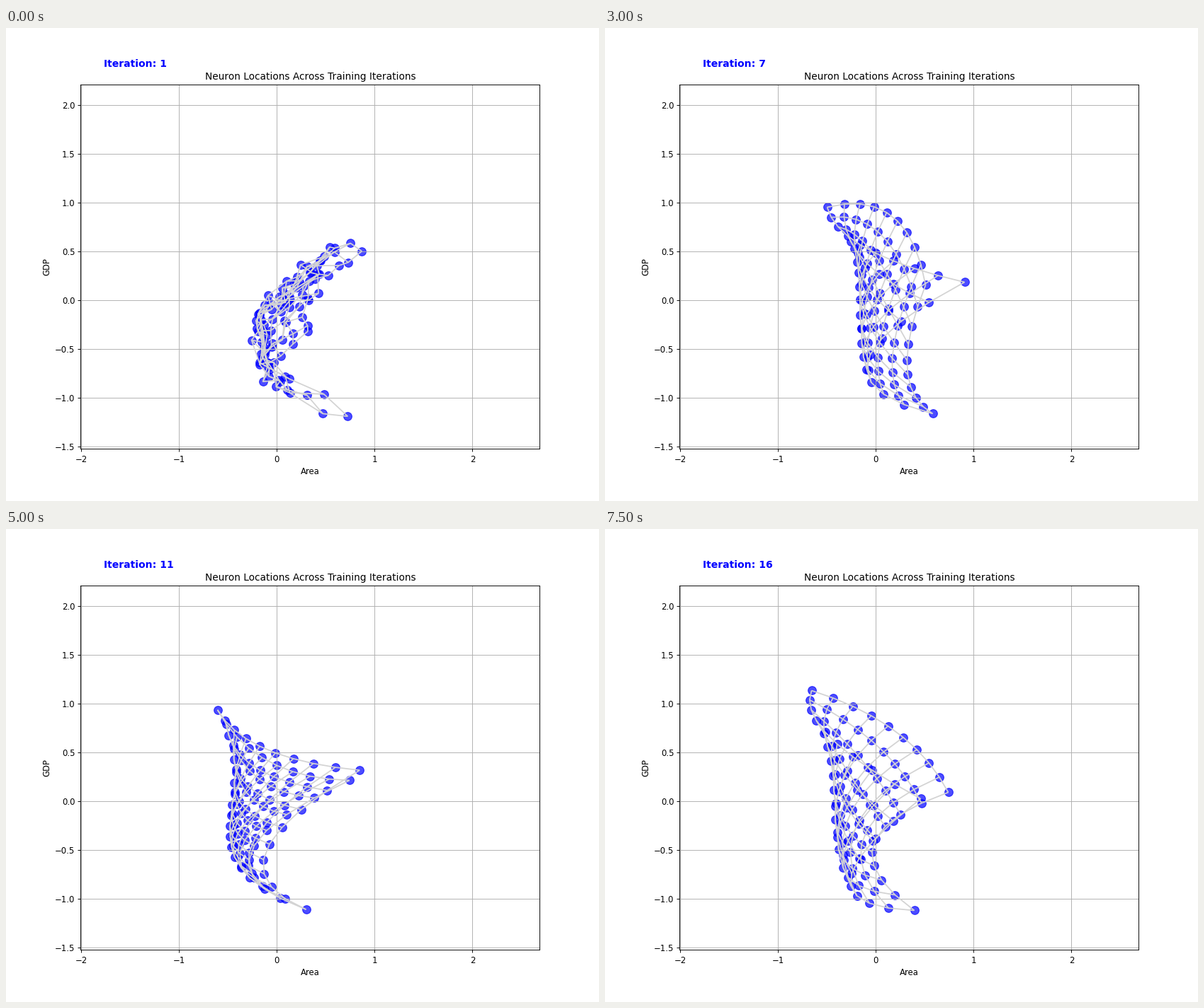
A matplotlib script for the animation above (8000 ms loop, 837 by 669 pixels).

```python
import numpy as np
import matplotlib.pyplot as plt
from matplotlib.animation import FuncAnimation
from matplotlib.collections import LineCollection

W, H, DPI = 837, 669, 83.7
LEFT, RIGHT, BOTTOM, TOP = 0.126, 0.9, 0.11, 0.88
SIZE = 10                         # neurons per side of the map
STEPS = 16
X0, Y0, UNIT = 382.4, 385.4, 138  # data origin and unit on the stage, in pixels

# Key shapes of the map: corners, edge middles and centre as stage positions
KEYS = {
    1: [[(492, 315), (437, 325), (434, 382)],
        [(440, 358), (365, 412), (360, 440)],
        [(416, 439), (375, 500), (481, 545)]],
    3: [[(399, 193), (449, 300), (410, 389)],
        [(493, 318), (458, 368), (350, 462)],
        [(434, 401), (358, 472), (390, 526)]],
    5: [[(276, 110), (304, 225), (397, 362)],
        [(317, 233), (322, 352), (422, 463)],
        [(438, 366), (349, 477), (390, 530)]],
    7: [[(313, 253), (405, 266), (452, 363)],
        [(370, 312), (363, 382), (426, 480)],
        [(507, 359), (370, 472), (462, 545)]],
    10: [[(297, 299), (341, 341), (523, 339)],
         [(355, 346), (300, 420), (380, 464)],
         [(478, 345), (325, 455), (463, 549)]],
    13: [[(300, 168), (423, 253), (450, 344)],
         [(403, 294), (350, 374), (338, 441)],
         [(497, 375), (385, 463), (343, 515)]],
    16: [[(291, 228), (410, 286), (484, 372)],
         [(318, 295), (331, 384), (378, 447)],
         [(445, 381), (346, 496), (436, 539)]],
}

# Quadratic weights that bend the map through three points each way
u = np.linspace(0, 1, SIZE)
BEND = np.stack([(1 - 2 * u) * (1 - u), 4 * u * (1 - u), u * (2 * u - 1)], axis=1)

# Random start that training has smoothed out by the third step
NOISE = np.random.default_rng(4).uniform(-11, 11, (SIZE, SIZE, 2))


def neurons(step):
    """Map of one step in data units, shape (SIZE, SIZE, 2)."""
    times = list(KEYS)
    points = np.array(list(KEYS.values()), float).reshape(len(times), -1)
    ctrl = [np.interp(step, times, track) for track in points.T]
    grid = np.einsum("ai,bj,ijk->abk", BEND, BEND, np.reshape(ctrl, (3, 3, 2)))
    grid += NOISE * max(0, (3 - step) / 2)
    return (grid + 0.5 - [X0, Y0]) / [UNIT, -UNIT]


fig, ax = plt.subplots(figsize=((W + 0.01) / DPI, (H + 0.01) / DPI), dpi=DPI)
fig.subplots_adjust(left=LEFT, right=RIGHT, bottom=BOTTOM, top=TOP)
ax.set_xlim((LEFT * W - X0) / UNIT, (RIGHT * W - X0) / UNIT)
ax.set_ylim((Y0 - (1 - BOTTOM) * H) / UNIT, (Y0 - (1 - TOP) * H) / UNIT)
ax.set_xticks(range(-2, 3))
ax.set_yticks(np.arange(-1.5, 2.1, 0.5))
ax.set_title("Neuron Locations Across Training Iterations", fontsize=11.9)
ax.set_xlabel("Area")
ax.set_ylabel("GDP")
ax.grid(True)

dots = ax.scatter(np.zeros(SIZE ** 2), np.zeros(SIZE ** 2), s=100, c="blue", alpha=0.7)
mesh = LineCollection([], colors="lightgray", linewidths=1.5, zorder=2)
ax.add_collection(mesh, autolim=False)
label = ax.text(0.05, 1.05, "", transform=ax.transAxes, color="blue",
                fontsize=12, fontweight="bold")


def update(i):
    grid = neurons(i + 1)
    dots.set_offsets(grid.reshape(-1, 2))
    mesh.set_segments([*grid, *grid.transpose(1, 0, 2)])
    label.set_text(f"Iteration: {i + 1}")
    return dots, mesh, label


anim = FuncAnimation(fig, update, frames=STEPS, interval=500, repeat=True,
                     repeat_delay=0, blit=False)
plt.show()
```
